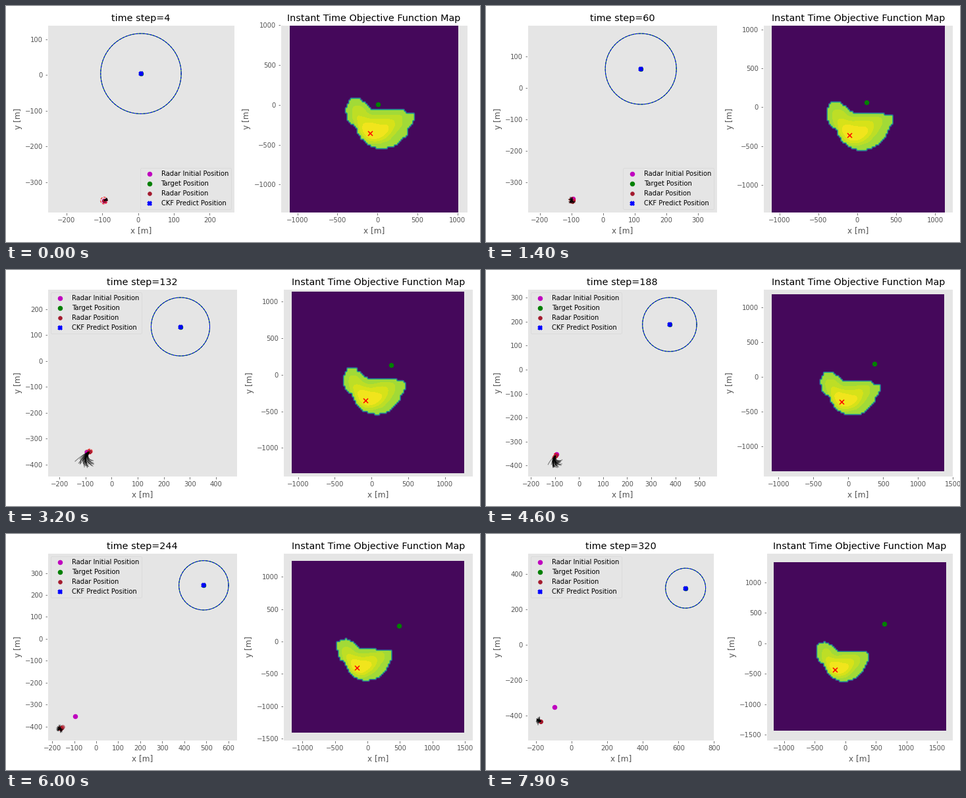
Recreate the animation shown at these times as a matplotlib script. Size 720 px wide and 360 px high, loop 8 s.

```python
import numpy as np
import matplotlib.pyplot as plt
from matplotlib.animation import FuncAnimation
from matplotlib.collections import LineCollection
from matplotlib.colors import ListedColormap
from matplotlib.path import Path

FRAMES, INTERVAL = 80, 100
W, H = 720, 360
RADIUS, RADAR_RING = 112.5, 9.5
LINES, GRID, BANDS = 36, 100, 25
START = (-95, -352)
CRIMSON = "#a31a2e"

plt.style.use("ggplot")
plt.rcParams.update({"axes.grid": False, "font.family": "DejaVu Sans"})

# step, radar x, radar y, heading, turn, turn spread, heading spread, length
KEYS = np.array([
    (4, -95, -352, 20, 0, 30, 8, 12),
    (60, -97, -358, 190, 60, 60, 70, 14),
    (122, -98, -348, 215, 70, 50, 12, 66),
    (132, -84, -349, 215, 70, 50, 12, 70),
    (178, -106, -368, 225, 90, 50, 12, 62),
    (188, -96, -358, 230, 100, 45, 12, 62),
    (244, -162, -408, 230, 0, 40, 90, 21),
    (280, -172, -420, 10, 0, 60, 60, 13),
    (320, -172, -433, 145, 30, 60, 20, 32),
])

# Outlines around the radar, in units of CELL metres
CELL = 8.2
LOBE = [(-34, 48), (-30, 54), (-16, 54), (-13, 50), (-8, 47), (4, 36),
        (54, 36), (56, 32), (68, 31), (70, 27)]
LATE_LOBE = [(-38, 51), (-31, 53), (-22, 56), (-17, 53), (-8, 50), (6, 36),
             (66, 35), (67, 28)]
BOWL = [(68, 18), (60, 6), (58, -3), (51, -10), (44, -17), (34, -22),
        (22, -25), (9, -24), (-3, -19), (-13, -10), (-19, -1), (-22, 8),
        (-33, 17), (-37, 25), (-38, 38)]
CENTRE = np.array((15, 12))
EARLY_EDGE, LATE_EDGE = (
    CENTRE + (np.array(top + BOWL) - CENTRE) * 0.975
    for top in (LOBE, LATE_LOBE))
INNER = [
    [(-27, 41), (-13, 41), (-1, 27), (51, 29), (51, 15), (41, 1), (27, -13),
     (9, -15), (-7, -9), (-19, 7), (-27, 25)],
    [(-21, 27), (-8, 25), (3, 21), (37, 23), (39, 11), (29, -3), (15, -14),
     (-1, -14), (-12, -6), (-20, 10)],
    [(-12, 16), (0, 17), (14, 13), (29, 12), (30, 3), (22, -5), (12, -11),
     (0, -12), (-8, -7), (-13, 3)],
]
ANGLE = np.linspace(0, 2 * np.pi, 120)


def state(step):
    return [np.interp(step, KEYS[:, 0], col) for col in KEYS.T[1:]]


def inside(points, pts):
    return Path(points).contains_points(pts).reshape(GRID, GRID).astype(float)


def blur(z, times=3):
    for _ in range(times):
        for axis in (0, 1):
            z = (np.roll(z, 1, axis) + 2 * z + np.roll(z, -1, axis)) / 4
    return z


def objective(box, rx, ry, late):
    mid = (np.arange(GRID) + 0.5) / GRID
    (x0, y0), (x1, y1) = box
    gx, gy = np.meshgrid(x0 + (x1 - x0) * mid - rx, y0 + (y1 - y0) * mid - ry)
    pts = np.column_stack((gx.ravel(), gy.ravel())) / CELL
    level = 0.86 + 0.04 * blur(sum(inside(p, pts) for p in INNER))
    return inside(LATE_EDGE if late else EARLY_EDGE, pts) * level


def rollouts(step):
    """Fan of random turning paths that leave the radar."""
    x, y, heading, turn, turn_sd, head_sd, length = state(step)
    rng = np.random.default_rng(step)
    h = np.radians(heading + head_sd * rng.uniform(-1.5, 1.5, LINES))
    w = np.radians(turn + turn_sd * rng.uniform(-1.6, 1.6, LINES))
    v = length * rng.uniform(0.6, 1, LINES)[:, None]
    a = h[:, None] + w[:, None] * np.linspace(0, 1, 16)
    return np.stack((x + np.cumsum(v * np.cos(a), 1) / 16,
                     y + np.cumsum(v * np.sin(a), 1) / 16), axis=2)


def dots(ax, color, marker="o", ms=6, mew=1.5, **kw):
    return ax.plot([], [], ls="", marker=marker, ms=ms, c=color, mew=mew,
                   **kw)[0]


def ring(ax, color, ls="-"):
    return ax.plot([], [], c=color, lw=1, ls=ls, zorder=2)[0]


def set_ring(line, x, y, r):
    line.set_data(x + r * np.cos(ANGLE), y + r * np.sin(ANGLE))


def place(ax, x0, width, top=29, bottom=315):
    ax.set_position([x0 / W, 1 - bottom / H, width / W, (bottom - top) / H])


def fit(ax, box, margin, x0):
    """Equal-aspect limits in the default box; returns the tick overhang."""
    (xa, ya), (xb, yb) = box
    mx, my = margin * (xb - xa), margin * (yb - ya)
    ax.dataLim.set_points(np.array(box, float))
    place(ax, x0, 253.6, 43.2, 320.4)
    ax.set_xlim(xa - mx, xb + mx)
    ax.set_ylim(ya - my, yb + my)
    ax.apply_aspect()
    lo, hi = ax.get_xlim()
    last = max(t for t in ax.get_xticks() if t <= hi)
    half = len(f"{last:.0f}") * 3.1
    return max(0, half - (hi - last) / (hi - lo) * 253.6)


fig, (left, right) = plt.subplots(1, 2, figsize=(W / 72, H / 72), dpi=72)

initial = dots(left, "m", label="Radar Initial Position", zorder=2)
initial.set_data([START[0]], [START[1]])
target = dots(left, "g", label="Target Position", zorder=3)
trail = dots(left, CRIMSON, mew=0.5, alpha=0.5, zorder=1.8)
radar = dots(left, CRIMSON, mew=0.5, label="Radar Position", zorder=2.1)
predict = dots(left, "b", "X", label="CKF Predict Position", zorder=4)
target_ring = ring(left, "g")
predict_ring = ring(left, "b", "--")
radar_ring = ring(left, "r", "--")
fan = LineCollection([], colors="k", linewidths=1, alpha=0.5, zorder=2.5)
left.add_collection(fan, autolim=False)
legend = left.legend(loc="lower right")

colors = plt.get_cmap("viridis")((np.arange(BANDS) + 0.5) / BANDS)
field = right.imshow(np.zeros((GRID, GRID)), cmap=ListedColormap(colors),
                     vmin=0, vmax=1, origin="lower",
                     interpolation="bilinear", interpolation_stage="data")
map_radar = dots(right, "r", "x", ms=7, zorder=3)
map_target = dots(right, "g", zorder=3)

for ax in (left, right):
    ax.set_autoscale_on(False)
    ax.set_aspect("equal", adjustable="datalim")
    ax.set_xlabel("x [m]")
    ax.set_ylabel("y [m]")
right.set_title("Instant Time Objective Function Map")


def update(i):
    step = 4 + 4 * i
    tx, ty = 2 * step, step
    rx, ry = state(step)[:2]
    past = np.array([state(step - d)[:2] for d in (9, 6, 3)])
    paths = rollouts(step)

    left.set_title(f"time step={step}")
    for mark in (target, predict, map_target):
        mark.set_data([tx], [ty])
    for mark in (radar, map_radar):
        mark.set_data([rx], [ry])
    trail.set_data(past.T)
    for line in (target_ring, predict_ring):
        set_ring(line, tx, ty, RADIUS)
    set_ring(radar_ring, rx, ry, RADAR_RING)
    fan.set_segments(paths)

    here, there = np.array((rx, ry)), np.array((tx, ty))
    pts = np.vstack((paths.reshape(-1, 2), past, [START],
                     here - RADAR_RING, here + RADAR_RING,
                     there - RADIUS, there + RADIUS))
    grid_box = np.array((here - 1000, there + 1000))
    (x0, y0), (x1, y1) = grid_box
    field.set_data(objective(grid_box, rx, ry, step > 216))
    field.set_extent((x0, x1, y0, y1))

    over_l = fit(left, (pts.min(0), pts.max(0)), 0.05, 90)
    over_r = fit(right, grid_box, 0, 394)
    width = (576.2 - over_l - over_r) / 2
    place(left, 63, width)
    place(right, 709.2 - over_r - width, width)
    left.apply_aspect()
    right.apply_aspect()

    lo, hi = left.get_xlim()
    clear = 63 + (tx - RADIUS - lo) / (hi - lo) * width > 206
    legend.set_loc("upper left" if clear else "lower right")


anim = FuncAnimation(fig, update, frames=FRAMES, interval=INTERVAL,
                     init_func=lambda: None, repeat=True, repeat_delay=0)
plt.show()
```
